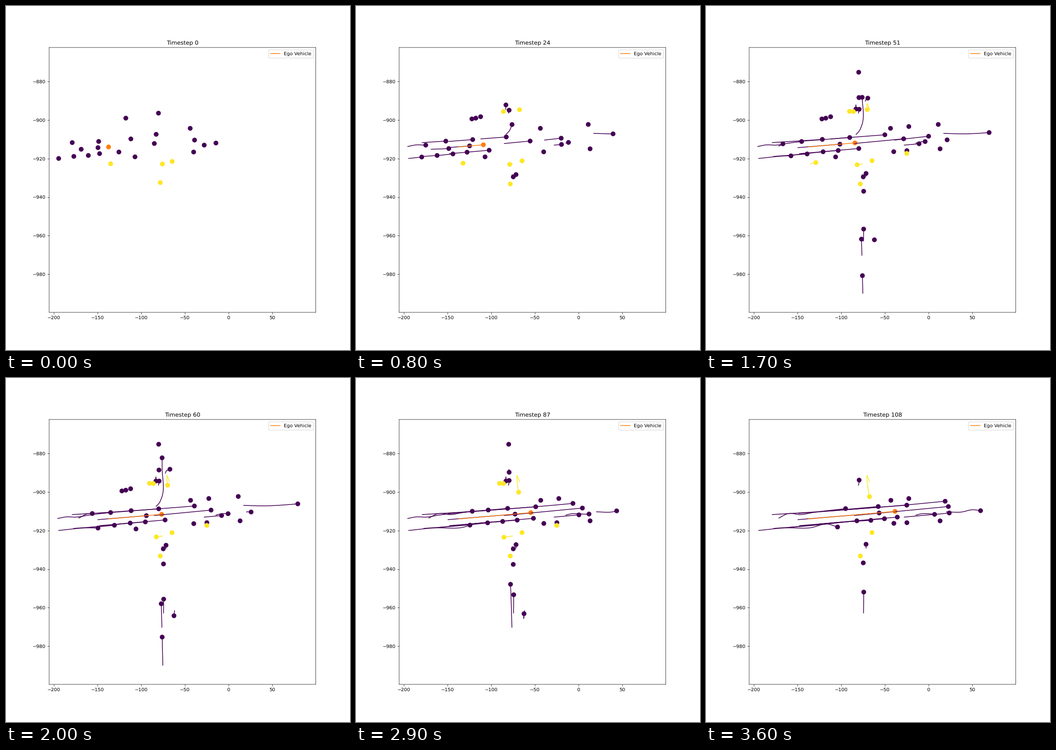
A matplotlib script that plays this animation: 748 px wide and 748 px high, repeating every 3.7 s.

```python
import numpy as np
import matplotlib.pyplot as plt
from matplotlib.animation import FuncAnimation

SIZE, DPI = 748, 74.8
FRAMES, STEP, INTERVAL = 37, 3, 100
END = (FRAMES - 1) * STEP
PURPLE, YELLOW, ORANGE = "#440154", "#fde725", "#ff7f0e"
LEFT, RIGHT, BOTTOM, TOP = 0.1255, 0.9005, 0.1095, 0.8795

tracks = []


def to_data(px, py):
    """Stage pixels to axis units."""
    return (px - 484.1) / 1.8985, -880 - (py - 163.8) / 4.196


def along(points, u):
    """Smooth curve through points; u is the share of its length."""
    p = np.array(points, float)
    s = np.append(0, np.cumsum(np.hypot(*np.diff(p, axis=0).T)))
    m = np.gradient(p, s, axis=0)
    d = u * s[-1]
    i = np.clip(np.searchsorted(s, d, "right") - 1, 0, len(s) - 2)
    h = (s[i + 1] - s[i])[:, None]
    v = (d - s[i])[:, None] / h
    w = 1 - v
    return (w * w * ((1 + 2 * v) * p[i] + v * h * m[i])
            + v * v * ((3 - 2 * v) * p[i + 1] - w * h * m[i + 1])).T


def drive(*points, power=1, first=0, last=END, stop=None, color=PURPLE):
    """Follow points from first to stop (or last), eased by a power law."""
    t = np.arange(first, last + 1)
    u = np.clip((t - first) / ((stop or last) - first), 0, 1) ** power
    tracks.append((first, last, *to_data(*along(points, u)), color))


def park(x, y, first=0, last=END, color=PURPLE):
    drive((x, y), (x, y + 0.1), first=first, last=last, color=color)


# Upper eastbound lane
drive((144, 297), (253, 290), (374.5, 279.5))
drive((201.5, 294.5), (436.5, 276.5))
drive((271.5, 289), (430.5, 276.5), (520, 268))
drive((112.5, 305.5), (131, 302), (152, 302.5), (181.5, 298), (312.5, 284.7),
      power=1.08, first=3, last=98)
drive((158.5, 304.5), (178, 295), (207.5, 297), (230, 293), (303.5, 284),
      first=47)

# Middle lane
drive((163.5, 311.5), (200.5, 310), (235, 307), last=45)
drive((200, 308), (376.5, 293.5), power=0.88)
drive((322.5, 299), (527, 279.5), power=0.86)
drive((410, 291.5), (495, 282), power=0.95, last=59)

# Lower lane
drive((114.5, 331.5), (171, 326), (228, 325.5), (264, 317.5), (286, 324),
      power=1.2)
drive((147.5, 327), (216, 322), (328, 310.5), power=1.22)
drive((179, 325), (287.5, 314), (358.5, 309.5), power=1.15)
drive((203.5, 321), (388, 306), power=1.05)
drive((245.5, 317.5), (416, 302.5), power=0.9)
drive((280.5, 328), (285, 328.5), power=3, last=77)

# East side
drive((431, 302.5), (497, 296.5), power=0.95)
drive((456.5, 298), (467, 295.5), (503, 296), (529, 293.5), power=1.7)
drive((517, 277), (559.5, 278), (657.5, 272), first=4, last=71)
drive((523, 291), (555, 291.5), (580, 286.5), (597, 288.5), power=1.2, first=49)

# North arm
drive((326.5, 279), (333, 272), (338.5, 260), (339.5, 195), (339, 130),
      power=1.6, last=74)
drive((331.5, 233), (333, 226), (333, 222), power=0.35)
drive((325.5, 225), (326, 215), (326, 224), first=10, stop=39, last=98)
drive((333, 204), (332.5, 199), (333, 205), first=33, stop=75, last=98)
drive((346.5, 207), (349, 201.5), (355, 199.5), (362, 191), first=35, last=76)

# South arm
drive((342.5, 511), (343, 465.5), power=0.45, first=28)
drive((339, 542), (337, 474), (335.5, 437), power=0.8, first=36, last=95)
drive((341, 624.5), (338.5, 515), first=36, last=79)
drive((343, 402), (342, 406), (342, 402), first=45)
drive((366.5, 506), (364.5, 523), (365.5, 511), first=48, stop=89, last=95)
drive((339.5, 367), (342, 373), (342, 371.5), first=14, stop=24, last=98)
drive((348, 370), (348, 361.5), power=0.4, first=14)

# Standing cars
drive((400.5, 266), (402, 266))
drive((408, 317.5), (408.5, 316))
park(260.5, 243.8, last=60)
park(252, 245.5, 9, 60)
park(271, 240.7, 9, 80)
park(505, 257.5, 9, 78)
park(509, 310.5, 12)
park(441, 262, 30)
park(436.8, 314.5, 30)
park(332, 144, 36, 95)

# Pedestrians
drive((227.5, 343), (240.5, 340), last=59, color=YELLOW)
drive((340, 343.5), (319.5, 346.6), power=0.9, last=98, color=YELLOW)
drive((361.5, 338), (361, 336), power=0.3, color=YELLOW)
drive((335.5, 384), (335.5, 387), stop=24, color=YELLOW)
drive((355.5, 225.5), (350.5, 212.5), (352, 238), (355.5, 258),
      power=0.62, first=24, color=YELLOW)
park(320.5, 229.5, 15, 98, YELLOW)
park(312, 229, 30, 98, YELLOW)
park(436.5, 320.5, 30, 98, YELLOW)

# Ego vehicle
drive((223, 306.5), (411, 290), power=0.83, color=ORANGE)

plt.rcParams.update({"text.hinting": "none", "axes.linewidth": 0.72,
                     "xtick.major.width": 0.72, "ytick.major.width": 0.72})
fig = plt.figure(figsize=(SIZE / DPI, SIZE / DPI), dpi=DPI)
ax = fig.add_axes([LEFT, BOTTOM, RIGHT - LEFT, TOP - BOTTOM])
x_min, y_min = to_data(LEFT * SIZE, (1 - BOTTOM) * SIZE)
x_max, y_max = to_data(RIGHT * SIZE, (1 - TOP) * SIZE)
ax.set(xlim=(x_min, x_max), ylim=(y_min, y_max))
title = ax.set_title("Timestep 0")
dots = ax.scatter([], [], s=80)
lines = [ax.plot([], [], color=tr[-1], lw=1.5)[0] for tr in tracks]
legend = ax.legend([lines[-1]], ["Ego Vehicle"], loc="upper right")

for part in (*ax.spines.values(), *ax.xaxis.get_ticklines(),
             *ax.yaxis.get_ticklines(), legend.get_frame(),
             *legend.get_lines()):
    part.set_snap(False)


def update(frame):
    now = frame * STEP
    spots, colors = [], []
    for line, (first, last, x, y, color) in zip(lines, tracks):
        n = now - first + 1 if first <= now <= last else 0
        line.set_data(x[:n], y[:n])
        if n:
            spots.append((x[n - 1], y[n - 1]))
            colors.append(color)
    dots.set_offsets(spots)
    dots.set_facecolor(colors)
    dots.set_edgecolor(colors)
    title.set_text(f"Timestep {now}")
    return [title, dots, *lines]


anim = FuncAnimation(fig, update, frames=FRAMES, interval=INTERVAL,
                     repeat=True, repeat_delay=0, blit=False)
plt.show()
```
